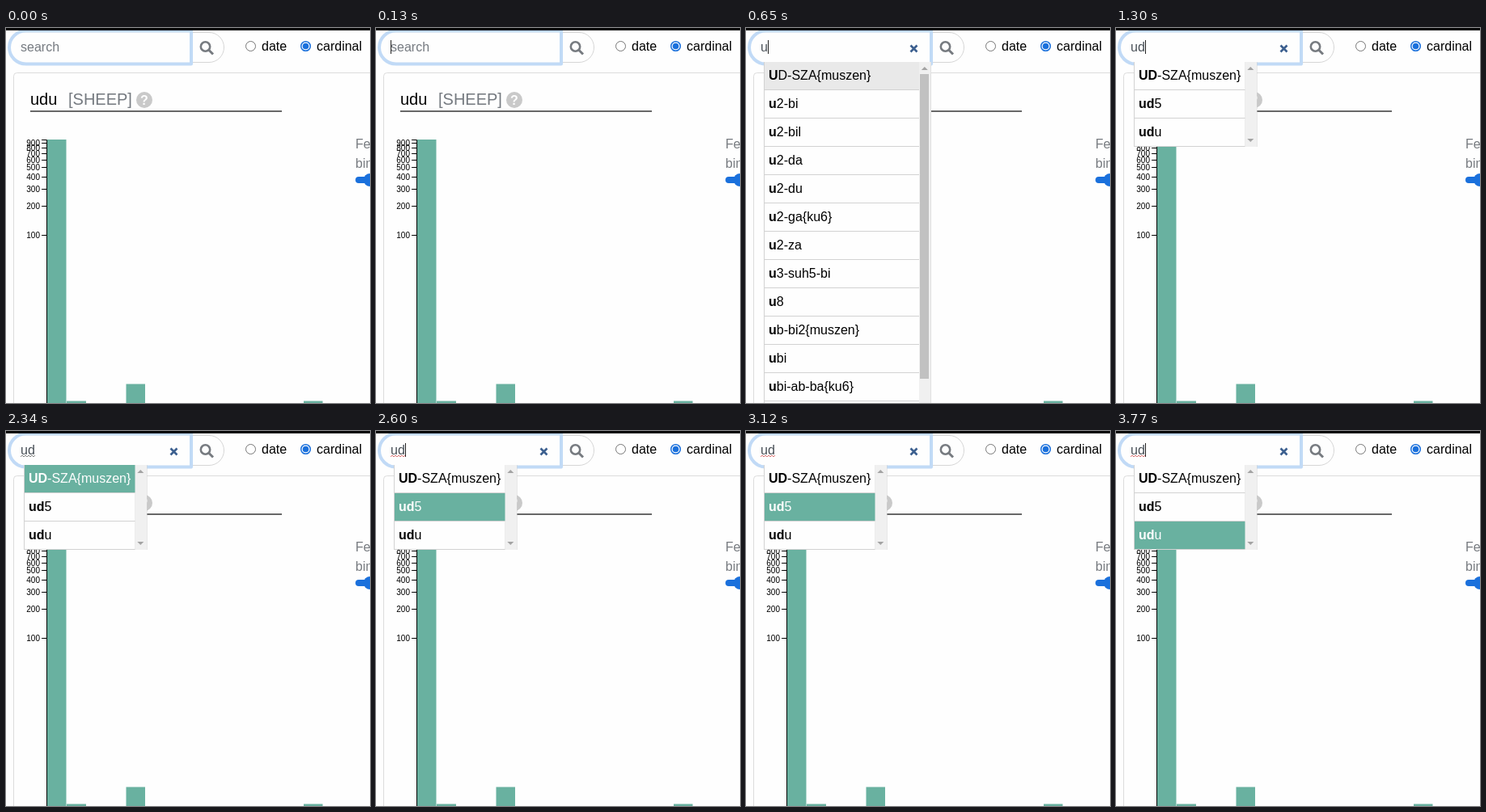
These frames come from a looping animation (450 by 464 pixels, 4160 ms). An HTML page:

```html
<!DOCTYPE html>
<html lang="en">
<head>
<meta charset="utf-8">
<title>Autocomplete search</title>
<style>
html, body { margin: 0; width: 100%; height: 100%; overflow: hidden; background: #fefefe; }
svg { display: block; width: 450px; height: 464px; font: 16px "Liberation Sans", Arial, sans-serif; }
text { white-space: pre; }
.bold { font-weight: bold; }
</style>
</head>
<body>
<svg id="stage" viewBox="0 0 450 464">
  <rect width="450" height="464" fill="#fefefe"/>

  <rect x="9.5" y="55.5" width="500" height="500" rx="4" fill="none" stroke="#dcdcdc"/>
  <text x="30" y="95" font-size="20">udu</text>
  <text x="77" y="95" font-size="20" fill="#757a80">[SHEEP]</text>
  <circle cx="171" cy="89" r="10" fill="#c9c9c9"/>
  <text x="171" y="95" font-size="16" class="bold" fill="#fefefe" text-anchor="middle">?</text>
  <path d="M30 103H341" stroke="#686868" stroke-width="2"/>

  <g fill="#777b80">
    <text x="432" y="149">Fewer</text>
    <text x="432" y="173">bins</text>
  </g>
  <rect x="432" y="184" width="30" height="8" rx="4" fill="#1a70dc"/>
  <circle cx="450" cy="188" r="8" fill="#1a70dc"/>

  <g id="chart"></g>

  <path d="M229 5.5H251A18.5 18.5 0 0 1 251 42.5H229" fill="#fefefe" stroke="#d6d6d6"/>
  <path d="M229 3.5H24.5A20.5 20.5 0 0 0 24.5 44.5H229Z" fill="#fefefe" stroke="#c1daf6" stroke-width="4" stroke-linejoin="round"/>
  <g fill="none" stroke="#777b80" stroke-width="2.6">
    <circle cx="246.5" cy="23" r="5.7"/>
    <path d="M250.5 27L256 32.5" stroke-width="3"/>
  </g>
  <rect width="450" height="3"/>

  <circle cx="302.5" cy="22.5" r="6" fill="#fefefe" stroke="#767676"/>
  <text x="316" y="28">date</text>
  <circle cx="370.5" cy="22.5" r="5.8" fill="#fefefe" stroke="#1a70dc" stroke-width="1.5"/>
  <circle cx="370.5" cy="22.5" r="3.8" fill="#1a70dc"/>
  <text x="384" y="28">cardinal</text>

  <text id="query" x="18" y="29"></text>
  <path id="squiggle" d="M18 32l2-2l2 2l2-2l2 2l2-2l2 2l2-2l2 2l2-2" fill="none"/>
  <rect id="caret" y="15" width="1" height="17" fill="#222"/>
  <path id="clear" d="M203.5 21.5l8 8m0-8l-8 8" stroke="#3c5f8f" stroke-width="2.6"/>

  <g id="menu"></g>
</svg>
<script>
const LOOP = 4160;
const TEAL = '#69b1a0';
const ROW = 35, TOP = 42, LEFT = 23;
const $ = id => document.getElementById(id);

const rect = (x, y, w, h, fill) =>
  `<rect x="${x}" y="${y}" width="${w}" height="${h}" fill="${fill}"/>`;
const arrow = (x, y, dir) =>
  `<path d="M${x - 4} ${y + 2 * dir}h8l-4 ${-4 * dir}z" fill="#a3a3a3"/>`;

const words = {
  u: ['UD-SZA{muszen}', 'u2-bi', 'u2-bil', 'u2-da', 'u2-du', 'u2-ga{ku6}', 'u2-za',
      'u3-suh5-bi', 'u8', 'ub-bi2{muszen}', 'ubi', 'ubi-ab-ba{ku6}'],
  ud: ['UD-SZA{muszen}', 'ud5', 'udu']
};

// Each step holds until the next one begins.
const steps = [
  { at: 0, query: '' },
  { at: 130, query: '', caret: true },
  { at: 650, query: 'u', caret: true, pick: 0, pickFill: '#e9e9e9', pickText: '#000' },
  { at: 1300, query: 'ud', caret: true },
  { at: 1950, query: 'ud', caret: true, pick: 0, wave: '#d77' },
  { at: 2340, query: 'ud', pick: 0, wave: '#888' },
  { at: 2600, query: 'ud', caret: true, pick: 1, wave: '#d77' },
  { at: 3120, query: 'ud', pick: 1, wave: '#d77' },
  { at: 3770, query: 'ud', caret: true, pick: 2, wave: '#d77' }
];

function chartMarkup() {
  let out = rect(51, 138, 23.5, 330, TEAL) + rect(75, 461.5, 24, 9, TEAL) +
    rect(148.5, 440.5, 23.5, 30, TEAL) + rect(368, 461.5, 23.5, 9, TEAL) +
    '<path d="M44 138.5H50.5V464" fill="none" stroke="#000"/>';
  for (let value = 100; value <= 900; value += 100) {
    const y = Math.round(256 - 119.6 * Math.log10(value / 100)) + 0.5;
    out += `<path d="M44 ${y}h6" stroke="#000"/>` +
      `<text x="42" y="${y + 3.5}" font-size="10" text-anchor="end">${value}</text>`;
  }
  return out;
}

function menuMarkup({ query, pick, pickFill = TEAL, pickText = '#fefefe' }) {
  const list = words[query];
  if (!list) return '';
  const long = query === 'u';
  const right = long ? 214 : 159.5;
  const bottom = long ? 470 : 147;
  let out = rect(LEFT - 1, TOP, right - LEFT + 16, bottom - TOP, '#d2d2d2') +
    rect(LEFT, TOP, right - LEFT, bottom - TOP, '#fefefe') +
    rect(right, TOP, 14.5, bottom - TOP, '#f0f0f0');
  list.forEach((word, i) => {
    const y = TOP + i * ROW, n = query.length;
    const chosen = i === pick;
    if (chosen) out += rect(LEFT, y, right - LEFT, ROW - 1, pickFill);
    out += rect(LEFT, y + ROW - 1, right - LEFT, 1, '#d2d2d2') +
      `<text x="28" y="${y + 22}" fill="${chosen ? pickText : '#000'}">` +
      `<tspan class="bold">${word.slice(0, n)}</tspan>${word.slice(n)}</text>`;
  });
  const mid = right + 6.8;
  out += arrow(mid, 50, 1);
  return out + (long ? rect(215, 57, 11, 377, '#c1c1c1') : arrow(mid, 139, -1));
}

function show(step) {
  const { query, caret, wave } = step;
  $('query').textContent = query || 'search';
  $('query').setAttribute('fill', query ? '#495057' : '#757a80');
  $('caret').setAttribute('x', 18 + Math.round(query.length * 8.9));
  $('caret').setAttribute('visibility', caret ? 'visible' : 'hidden');
  $('squiggle').setAttribute('stroke', wave || 'none');
  $('clear').setAttribute('visibility', query ? 'visible' : 'hidden');
  $('menu').innerHTML = menuMarkup(step);
}

let current;
function frame() {
  const time = performance.now() % LOOP;
  const step = steps.filter(s => s.at <= time).pop();
  if (step !== current) show(current = step);
  requestAnimationFrame(frame);
}

$('chart').innerHTML = chartMarkup();
frame();
</script>
</body>
</html>
```
